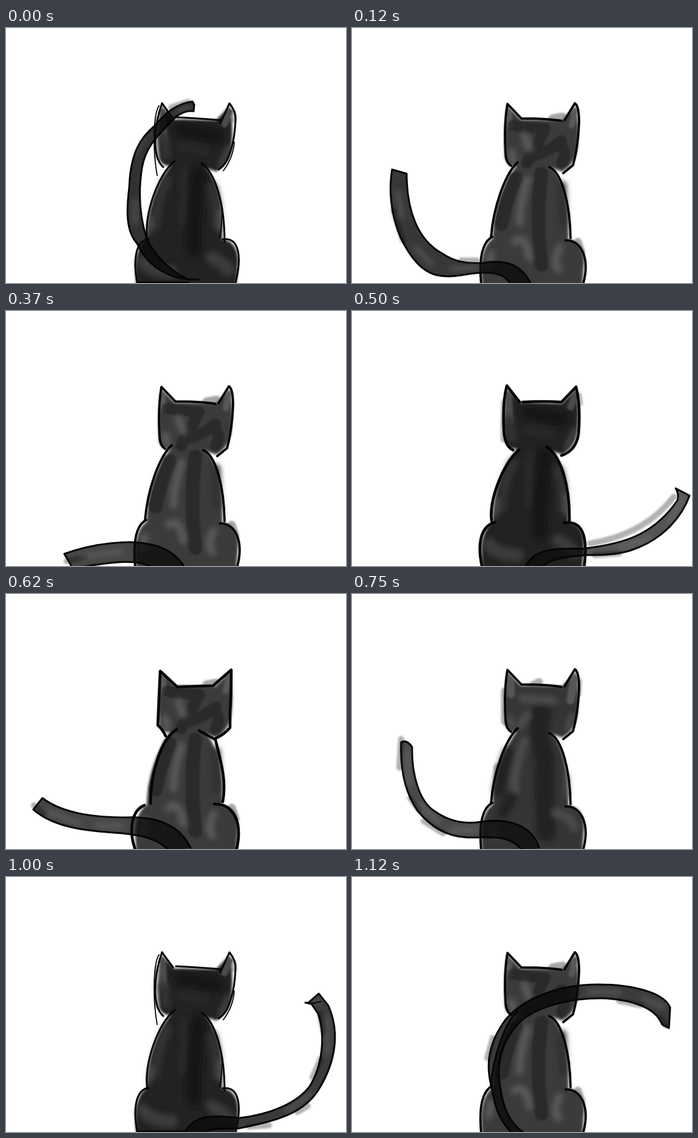
An HTML page for the animation above (1.25 s loop, 560 by 420 pixels).

```html
<!DOCTYPE html>
<html lang="en">
<head>
<meta charset="utf-8">
<title>Cat swishing its tail</title>
<style>
html, body { margin: 0; width: 100%; height: 100%; overflow: hidden; background: #fff; }
svg { display: block; width: 100vw; height: 100vh; }
path { fill: none; stroke-linecap: round; stroke-linejoin: round; }

/* Drawings alternate between 120 ms and 130 ms on screen */
.pose { visibility: hidden; animation: short 1250ms step-end infinite; animation-delay: calc((var(--at) - 1250) * 1ms); }
.pose:nth-of-type(even) { animation-name: long; }
@keyframes short { 0% { visibility: visible; } 9.6%, 100% { visibility: hidden; } }
@keyframes long { 0% { visibility: visible; } 10.4%, 100% { visibility: hidden; } }

.ink path { stroke: #050505; stroke-width: 3.8; }
.ink.thick path { stroke-width: 4.6; }
.ink.fine path { stroke-width: 3; }
.ink path.hair { stroke-width: 1.8; }
.wash { filter: url(#soft); }
.rim { fill: none; stroke: #777; stroke-opacity: .45; stroke-width: 4; }
.tail .fill { fill: #0b0b0b; fill-opacity: var(--a, .78); stroke: #050505; stroke-width: 3; }
.tail .smudge { stroke: #555; stroke-opacity: .45; stroke-width: 10; filter: url(#soft); }
.tail .sheen { stroke: #888; stroke-opacity: .28; stroke-width: 9; filter: url(#softer); }
</style>
</head>
<body>
<svg viewBox="0 0 560 420" preserveAspectRatio="none">
<defs>
  <filter id="soft" filterUnits="userSpaceOnUse" x="0" y="0" width="560" height="440"><feGaussianBlur stdDeviation="1.4"/></filter>
  <filter id="softer" filterUnits="userSpaceOnUse" x="0" y="0" width="560" height="440"><feGaussianBlur stdDeviation="4"/></filter>
  <path id="body" style="fill:inherit" d="M256 129 L278 151 L346 152 L368 129 Q375 160 371 198 Q367 225 346 236 L328 230 C346 245 357 290 356 348 Q382 352 382 385 L379 424 H215 Q208 365 232 347 Q234 280 271 227 Q258 228 253 216 Q249 170 256 129Z"/>

  <!-- Washes -->
  <g id="dark">
    <g class="wash">
      <path stroke="#777" stroke-opacity=".5" stroke-width="9" d="M374 139 L376 152 M250 150 L249 212"/>
      <use href="#body" fill="#212121"/>
      <use href="#body" class="rim"/>
      <path stroke="#4c4c4c" stroke-width="11" d="M258 138 L260 182 M368 138 L360 158"/>
    </g>
    <g filter="url(#softer)">
      <path stroke="#333" stroke-width="16" d="M259 180 L264 208 M266 250 Q248 285 246 325 M340 262 Q348 290 347 325"/>
      <path stroke="#181818" stroke-width="26" d="M290 167 L345 178 M318 238 Q308 300 310 365"/>
      <path stroke="#292929" stroke-width="9" d="M292 235 L290 320 M285 196 L330 204"/>
      <path stroke="#3b3b3b" stroke-width="22" d="M226 385 Q240 402 272 402 M340 378 Q355 386 366 398"/>
      <path stroke="#666" stroke-width="4" d="M238 312 L236 338 M352 302 L353 335 M352 227 L368 195"/>
    </g>
  </g>
  <g id="mid">
    <g class="wash">
      <path stroke="#777" stroke-opacity=".65" stroke-width="13" d="M330 149 L347 146 M372 352 L378 370"/>
      <use href="#body" fill="#3b3b3b"/>
      <use href="#body" class="rim"/>
      <path stroke="#585858" stroke-width="10" d="M258 139 L259 160 M367 137 L362 160"/>
      <path stroke="#2a2a2a" stroke-width="19" stroke-opacity=".85" d="M266 160 Q285 164 318 166 Q304 196 288 222 M292 212 Q322 206 345 186 M340 190 Q357 205 345 222"/>
      <path stroke="#2a2a2a" stroke-width="23" d="M312 240 Q302 310 312 390"/>
      <path stroke="#2a2a2a" stroke-width="24" d="M270 248 Q254 280 246 322"/>
    </g>
    <g filter="url(#softer)">
      <path stroke="#585858" stroke-width="13" d="M284 178 L292 198 M289 250 Q276 290 276 320 M268 352 Q285 338 292 378 M342 362 Q330 385 340 397 M228 372 L226 393 M262 205 L266 220"/>
      <path stroke="#303030" stroke-width="16" d="M345 260 L347 320"/>
    </g>
  </g>
  <g id="grey">
    <g class="wash">
      <path stroke="#777" stroke-opacity=".6" stroke-width="13" d="M298 150 L308 145 M372 144 L371 165 M252 160 L252 210 M238 318 L240 285"/>
      <use href="#body" fill="#343434"/>
      <use href="#body" class="rim"/>
      <path stroke="#565656" stroke-width="13" d="M260 141 L262 165 M366 139 L360 175"/>
    </g>
    <g filter="url(#softer)">
      <path stroke="#222" stroke-width="32" d="M314 190 Q302 230 318 270 Q315 330 320 392"/>
      <path stroke="#4b4b4b" stroke-width="14" d="M280 172 L330 176 M284 242 Q266 290 268 325 M288 200 L277 217 M335 360 Q362 365 366 385 M228 384 L238 398"/>
      <path stroke="#242424" stroke-width="20" d="M262 335 L248 360 M258 262 Q245 300 242 325"/>
      <path stroke="#5a5a5a" stroke-width="6" d="M260 202 L264 222 M362 200 L355 222 M354 298 L355 332"/>
    </g>
  </g>

  <!-- Outlines -->
  <g id="sketchy" class="ink fine">
    <path d="M257 124 L275 149 M280 147 Q320 149 354 152 M353 157 L368 124 Q379 138 378 150 Q377 190 364 218 Q358 228 350 233"/>
    <path d="M257 124 Q244 160 246 195 Q248 220 259 229"/>
    <path class="hair" d="M252 128 Q244 140 244 185 Q244 215 249 243 M376 188 Q374 214 358 235 M355 290 Q357 320 352 346"/>
    <path d="M278 219 C250 241 226 310 233 349 M322 223 C345 238 360 290 360 352"/>
    <path d="M235 347 C212 351 209 385 217 424 M357 348 C384 344 389 376 378 420 M217 419 H300"/>
  </g>
  <g id="open" class="ink">
    <path d="M262 227 Q254 222 253 208 Q250 160 256 125 L279 149 Q320 149 345 153 M350 152 L367 124 Q374 128 374 155 Q372 198 364 226 L348 239"/>
    <path d="M273 221 C252 240 233 295 229 344 M325 229 C346 238 359 290 360 346"/>
    <path d="M231 344 C212 354 209 385 213 424 M352 350 C378 349 393 380 380 424"/>
  </g>
  <g id="bold" class="ink thick">
    <path d="M263 234 Q258 223 250 216 Q252 170 254 127 L282 153 L341 151 L371 125 Q371 165 369 195 L369 220 Q360 231 345 238"/>
    <path d="M281 223 C254 240 238 298 238 345 M318 225 L345 240 C352 270 364 305 357 342"/>
    <path d="M228 348 C205 357 202 394 214 424 M343 346 C372 345 392 372 379 424"/>
  </g>
  <g id="round" class="ink thick">
    <path d="M265 229 Q250 222 250 190 Q248 150 255 123 L276 150 M281 150 Q315 148 345 150 L369 125 Q377 158 373 203 Q369 230 345 238"/>
    <path d="M275 229 C250 250 225 310 230 346 M321 224 C345 240 359 290 358 346"/>
    <path d="M236 348 C210 354 206 388 215 424 M349 349 C378 345 390 367 382 424"/>
  </g>

  <!-- Tails -->
  <g id="overLeft" class="tail" style="--a:.84">
    <path class="smudge" d="M272 131 L300 122 M222 205 L235 184"/>
    <path class="fill" d="M317 414 C272 417 234 394 216 355 C196 333 199 295 203 262 C205 205 222 180 246 160 C262 140 280 125 307 121 L310 126 L309 137 C294 135 281 144 273 153 C250 178 230 195 224 230 C216 280 223 320 232 348 C248 378 270 400 300 414"/>
    <path class="sheen" d="M218 206 L234 182 M213 285 L212 320 M285 134 L300 130"/>
  </g>
  <g id="leftHigh" class="tail" style="--a:.82">
    <path class="smudge" d="M68 300 L84 350 M180 383 L205 383"/>
    <path class="fill" d="M262 424 C255 408 240 403 218 403 C190 403 170 412 145 408 C116 404 96 378 80 345 C64 306 60 270 66 233 L90 240 C90 300 108 349 148 371 C168 385 188 388 215 387 C262 379 282 396 294 420"/>
    <path class="sheen" d="M75 270 L82 310 M105 362 L130 388 M165 397 L205 394"/>
  </g>
  <g id="leftMid" class="tail" style="--a:.76">
    <path class="smudge" d="M17 344 L44 354 M160 301 L180 300 M216 338 L232 346"/>
    <path class="fill" d="M276 424 C264 390 240 350 204 332 C165 316 128 331 100 343 C78 355 48 357 22 352 L22 322 C60 328 95 312 120 305 C158 295 190 300 215 311 C255 325 288 375 302 410"/>
    <path class="sheen" d="M50 341 L88 331 M130 318 L165 311"/>
  </g>
  <g id="leftLow" class="tail" style="--a:.76">
    <path class="smudge" d="M100 412 L130 405"/>
    <path class="fill" d="M245 424 C215 406 170 414 110 424 L96 400 C145 382 205 376 240 385 C268 391 284 405 294 422"/>
    <path class="sheen" d="M125 404 L190 396"/>
  </g>
  <g id="rightLow" class="tail" style="--a:.7">
    <path class="smudge" d="M392 383 Q482 368 530 306 M400 402 L440 399"/>
    <path class="fill" d="M284 424 C302 384 350 393 384 391 C450 383 497 368 536 312 Q539 302 533 292 L556 304 C545 335 515 376 460 394 C435 402 410 402 385 402 C350 405 325 408 310 424"/>
    <path class="sheen" d="M545 308 L524 346 M490 374 L440 390"/>
  </g>
  <g id="leftFlat" class="tail" style="--a:.76">
    <path class="smudge" d="M46 348 L62 362"/>
    <path class="fill" d="M270 424 C250 402 220 397 190 394 C130 390 80 385 45 355 L60 336 C95 363 150 368 200 368 C260 366 290 388 304 418"/>
    <path class="sheen" d="M72 360 L120 377 M150 381 L190 382"/>
  </g>
  <g id="leftHook" class="tail" style="--a:.74">
    <path class="smudge" d="M81 239 L78 286 M96 336 L110 356 M118 374 L150 394"/>
    <path class="fill" d="M282 424 C260 394 225 402 190 401 C155 399 130 384 108 357 C88 328 79 290 81 244 Q90 239 99 252 C98 300 112 342 135 357 C163 377 188 379 215 375 C260 368 298 383 308 418"/>
    <path class="sheen" d="M91 260 L94 310 M112 347 L140 374 M165 389 L205 388"/>
  </g>
  <g id="rightFloor" class="tail" style="--a:.76">
    <path class="smudge" d="M450 400 L500 384"/>
    <path class="fill" d="M290 424 C308 390 350 390 384 392 C430 390 470 378 502 356 L520 370 C490 398 440 408 385 410 C350 412 330 414 318 424"/>
    <path class="sheen" d="M420 398 L490 380"/>
  </g>
  <g id="rightHigh" class="tail" style="--a:.8">
    <path class="smudge" d="M517 225 L523 255 M518 300 L505 330 M400 411 L433 409 M480 387 L497 377"/>
    <path class="fill" d="M295 420 C312 388 350 393 384 397 C436 391 480 372 500 345 C522 310 526 260 514 225 L503 209 L493 207 L498 207 L515 192 L531 212 C550 255 543 302 518 345 C492 392 440 402 384 414 C355 414 330 414 315 424"/>
    <path class="sheen" d="M511 203 L516 206 M529 235 L530 290 M500 358 L465 385"/>
    <path stroke="#050505" stroke-width="2" d="M503 209 L519 205"/>
  </g>
  <g id="overRight" class="tail" style="--a:.8">
    <path class="smudge" d="M232 265 L223 298 M508 232 L516 244 M440 204 L475 211"/>
    <path class="fill" d="M266 424 C240 400 235 375 230 347 C220 310 224 275 252 236 C282 200 340 177 405 177 C462 177 514 190 524 215 L522 249 L511 243 C500 215 462 203 420 200 C362 198 303 213 275 240 C242 276 237 316 245 350 C250 388 266 410 284 422"/>
    <path class="sheen" d="M390 188 L440 190 M480 199 L512 214"/>
  </g>
</defs>

<g class="pose" style="--at:0"><use href="#dark"/><use href="#sketchy"/><use href="#overLeft"/></g>
<g class="pose" style="--at:120"><use href="#mid"/><use href="#open"/><use href="#leftHigh"/></g>
<g class="pose" style="--at:250"><use href="#grey"/><use href="#bold"/><use href="#leftMid"/></g>
<g class="pose" style="--at:370"><use href="#mid"/><use href="#open"/><use href="#leftLow"/></g>
<g class="pose" style="--at:500"><use href="#dark"/><use href="#round"/><use href="#rightLow"/></g>
<g class="pose" style="--at:620"><use href="#mid"/><use href="#bold"/><use href="#leftFlat"/></g>
<g class="pose" style="--at:750"><use href="#grey"/><use href="#open"/><use href="#leftHook"/></g>
<g class="pose" style="--at:870"><use href="#mid"/><use href="#bold"/><use href="#rightFloor"/></g>
<g class="pose" style="--at:1000"><use href="#dark"/><use href="#sketchy"/><use href="#rightHigh"/></g>
<g class="pose" style="--at:1120"><use href="#mid"/><use href="#open"/><use href="#overRight"/></g>
</svg>
</body>
</html>
```
